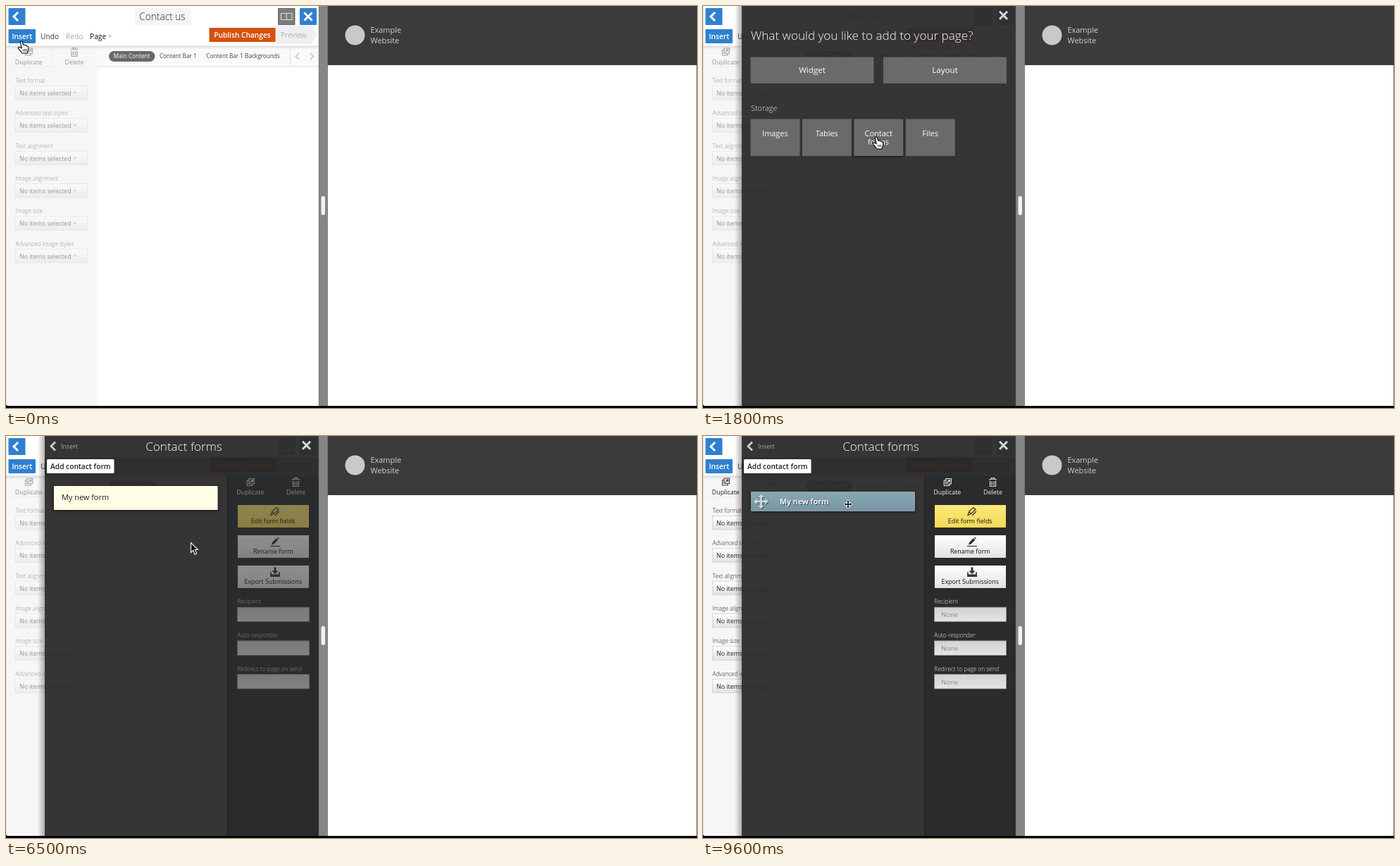
Recreate the animation shown at these times as an HTML page. Size 981x571 px, loop 9900 ms.

```html
<!DOCTYPE html>
<html lang="en">
<head>
<meta charset="utf-8">
<title>Adding a contact form</title>
<style>
  html, body { margin: 0; width: 100%; height: 100%; overflow: hidden; background: #000; }
  svg { display: block; }
  text { font-family: "Open Sans", "Noto Sans", sans-serif; white-space: pre; }
</style>
</head>
<body>
<svg id="stage" width="981" height="571" viewBox="0 0 981 571"></svg>
<script>
const LOOP = 9900, STEP = 100;
const SMALL = 8.2, LABEL = 8.9, MENU = 10.2, BODY = 10.93, HEAD = 17.1;

// Markup helpers
const text = (x, y, size, str, fill, weight = 400, anchor = 'start', extra = '') =>
  `<text x="${x}" y="${y}" font-size="${size}" fill="${fill}" font-weight="${weight}" text-anchor="${anchor}" ${extra}>${str}</text>`;
const mid = (x, y, size, str, fill, weight) => text(x, y, size, str, fill, weight, 'middle');
const rect = (x, y, w, h, fill, extra = '') =>
  `<rect x="${x}" y="${y}" width="${w}" height="${h}" fill="${fill}" ${extra}/>`;
const line = (d, stroke, width, extra = '') =>
  `<path d="${d}" fill="none" stroke="${stroke}" stroke-width="${width}" ${extra}/>`;
const fill = (d, color, extra = '') => `<path d="${d}" fill="${color}" ${extra}/>`;
const group = (id, body, extra = '') => `<g id="${id}" ${extra}>${body}</g>`;
const cross = (x, y, r, color, width) =>
  line(`M${x - r} ${y - r}l${2 * r} ${2 * r}m0 ${-2 * r}l${-2 * r} ${2 * r}`, color, width);
const chevron = (x, y, r, color, width) => line(`M${x + r} ${y - r}l${-r} ${r}l${r} ${r}`, color, width);
const grad = (id, from, to) =>
  `<linearGradient id="${id}" x2="0" y2="1"><stop stop-color="${from}"/><stop offset="1" stop-color="${to}"/></linearGradient>`;

// Icons, centred on x, y
const at = (x, y, body) => `<g transform="translate(${x} ${y})">${body}</g>`;
const copyIcon = (x, y, c) => at(x, y,
  line('M-2.5-5H5V2.5H-2.5ZM-3-2.5H-5V5H2.5V3', c, 1.2) + line('M-1 1L3-3M0-3H3V0', c, 1.2));
const binIcon = (x, y, c) => at(x, y,
  line('M-5.5-4H5.5M-2-4V-6H2V-4M-4-2V6H4V-2M-1.5-1V4.5M1.5-1V4.5', c, 1.2));
const pencilIcon = (x, y, c) => at(x, y,
  line('M-6 5L-4.5 0L2-6L5-3L-1.5 3ZM-4.5 0L-1.5 3M0 5.5L6-.5', c, 1.2));
const penIcon = (x, y, c) => at(x, y, fill('M-5 4L-4 .5L2-5.5L4.5-3L-1.5 3ZM3-6.3L4-7L6-5L5.2-4Z', c) + line('M-7 6H7', c, 1.2));
const saveIcon = (x, y, c) => at(x, y,
  fill('M-1.5-7H1.5V-2H4.5L0 2.5L-4.5-2H-1.5Z', c) + line('M-6 0V5.5H6V0', c, 1.8) + line('M-6 4H6', c, 2));
const fourWay = 'M0-10L4-6H1.3V-1.3H6V-4L10 0L6 4V1.3H1.3V6H4L0 10L-4 6H-1.3V1.3H-6V4L-10 0L-6-4V-1.3H-1.3V-6H-4Z';

const defs = `<defs>
  ${grad('btn', '#fff', '#e2e2e2')}${grad('gold', '#fbe878', '#f5da59')}
  ${grad('field', '#d2d2d2', '#e4e4e4')}${grad('row', '#fff', '#ededed')}${grad('rowOn', '#89a8b5', '#7796a4')}
  ${grad('topShade', '#000', '#fff')}
  <linearGradient id="edge"><stop stop-opacity="0"/><stop offset="1" stop-opacity=".3"/></linearGradient>
  <linearGradient id="under" x2="0" y2="1"><stop stop-opacity=".12"/><stop offset="1" stop-opacity="0"/></linearGradient>
  <clipPath id="editor"><path d="M0 0H444V568H4Q0 568 0 564Z"/></clipPath>
  <filter id="drop" x="-20%" y="-20%" width="140%" height="150%"><feDropShadow dx="0" dy="1" stdDeviation="2" flood-opacity=".6"/></filter>
  <filter id="engrave"><feDropShadow dx="1" dy="1" stdDeviation=".3" flood-color="#26343b" flood-opacity=".9"/></filter>
</defs>`;

// Editor behind the sliding panel
const selects = ['Text format', 'Advanced text styles', 'Text alignment', 'Image alignment', 'Image size', 'Advanced image styles'];
const sidebar = copyIcon(32.5, 65, '#444') + mid(32.3, 82.5, LABEL, 'Duplicate', '#222') +
  binIcon(97, 65.5, '#444') + mid(97, 82.5, LABEL, 'Delete', '#222') +
  selects.map((name, i) => {
    const y = i * 46.35;
    return text(13.5, 109 + y, SMALL, name, '#222', 300) +
      rect(13.5, 113.5 + y, 102, 19.5, 'url(#btn)', 'stroke="#cfcfcf" stroke-width=".8"') +
      text(19, 127 + y, LABEL, 'No items selected', '#222') +
      fill(`M95.5 ${122 + y}h5l-2.5 3z`, '#aaa');
  }).join('');

const editor = rect(0, 0, 444, 568, '#fff') +
  rect(0, 57, 129.5, 511, '#f6f6f6') + rect(129.5, 57, 315, 29, '#fafafa') +
  line('M129.5 86.2H444M403.5 57V86', '#dedede', 1) +
  line('M65 58V86M0 86H129', '#eee', 1) + line('M.5 0V568', '#e4e4e4', 1) +
  rect(0, 56.5, 444, 5, 'url(#under)') +
  rect(3.5, 3, 24, 24, '#2f80cf', 'rx="1"') + chevron(11, 15, 6, '#fff', 3) +
  rect(182.5, 3, 80, 24, '#f5f5f5', 'rx="2"') + mid(222, 19.7, 13.66, 'Contact us', '#222', 300) +
  rect(386.5, 3.5, 23.5, 23, '#7c7c7c', 'stroke="#555" stroke-width=".8"') +
  line('M390.5 10.5H406V19.5H390.5ZM398.3 10.5V19.5', '#ddd', 1.1) +
  rect(417, 3, 24, 24, '#2f80cf', 'rx="1"') + cross(429, 15, 5.5, '#fff', 3) +
  rect(3.5, 33, 38.5, 20, '#2f80cf', 'rx="1"') + mid(22.8, 46.5, MENU, 'Insert', '#fff', 600) +
  text(49, 46.5, MENU, 'Undo', '#333') + text(85, 46.5, MENU, 'Redo', '#aaa') +
  text(119, 46.5, MENU, 'Page', '#111') + fill('M145 41.5h5l-2.5 3z', '#bbb') +
  fill('M382 28H433L441.5 41L433 54H382Z', '#efefef') +
  rect(288.5, 31, 94, 20, '#d4500f') + mid(335.5, 44.6, MENU, 'Publish Changes', '#fff', 600) +
  mid(408.3, 44.6, MENU, 'Preview', '#b0b0b0') +
  rect(146, 64, 65.5, 15, '#686868', 'rx="7.5"') + mid(178.6, 74.4, SMALL, 'Main Content', '#fff') +
  mid(244.3, 74.4, SMALL, 'Content Bar 1', '#444') + mid(336.5, 74.4, SMALL, 'Content Bar 1 Backgrounds', '#444') +
  chevron(411.5, 71.5, 4.5, '#ccc', 2) + line('M432 67l4.5 4.5l-4.5 4.5', '#ccc', 2) +
  group('sidebar', sidebar);

// Panel: choose what to insert
const tile = (x, y, w, h, extra = '') => rect(x, y, w, h, '#6a6a6a', `stroke="#747474" stroke-width=".7" ${extra}`);
const chooser = text(68, 48.3, HEAD, 'What would you like to add to your page?', '#fff', 300) +
  tile(68, 73, 174, 36.5) + mid(155, 95, 11.6, 'Widget', '#fff') +
  tile(256.5, 73, 174, 36.5) + mid(343.5, 95, 11.6, 'Layout', '#fff') +
  text(68, 149, BODY, 'Storage', '#e4e4e4', 300) +
  ['Images', 'Tables', 'Contact', 'Files'].map((name, i) => {
    const x = 68 + i * 73.4;
    return tile(x, 161, 69, 51.5, i === 2 ? 'id="hover"' : '') + mid(x + 34.4, 185, BODY, name, '#fff');
  }).join('') + mid(249, 197, BODY, 'forms', '#fff');

// Panel: contact forms
const button = (y, paint, icon, label) =>
  rect(329, y, 101, 32, paint) + icon(382, y + 9.5, '#333') + mid(379.2, y + 26, LABEL, label, '#111');
const field = (y, label) => text(328.3, y - 5, SMALL, label, '#eee', 300) +
  rect(328.5, y, 102, 20.5, 'url(#field)', 'stroke="#8f8f8f" stroke-width=".8"');
const fieldTops = [243.2, 290.9, 338.5];
const tools = copyIcon(347.3, 65.5, '#ddd') + mid(346.8, 82.5, LABEL, 'Duplicate', '#eee') +
  binIcon(411.5, 65.5, '#ddd') + mid(411.5, 82.5, LABEL, 'Delete', '#eee') +
  button(98, 'url(#gold)', pencilIcon, 'Edit form fields') +
  button(141, 'url(#btn)', penIcon, 'Rename form') +
  button(184, 'url(#btn)', saveIcon, 'Export Submissions') +
  ['Recipient', 'Auto-responder', 'Redirect to page on send'].map((s, i) => field(fieldTops[i], s)).join('');

const formsPage = rect(55, 30, 389, 27, '#000', 'opacity=".12"') +
  rect(314, 57, 130, 511, '#2a2b2d') + line('M314.5 57V568', '#1f1f1f', 1) +
  chevron(64, 14.5, 6, '#ccc', 2.8) + text(78, 18.3, LABEL, 'Insert', '#aaa') +
  mid(252.5, 21, HEAD, 'Contact forms', '#fff', 300) +
  rect(58, 33, 95.5, 20, '#fff', 'rx="1.5"') + mid(105.8, 46.5, MENU, 'Add contact form', '#222', 600) +
  group('tools', tools) + group('values', fieldTops.map(y => text(338, y + 14, 9.56, 'None', '#888')).join('')) +
  group('empty', mid(184.5, 104.5, HEAD, "You haven't added any", '#e8e8e8', 300) + mid(184.5, 125, HEAD, 'forms yet', '#e8e8e8', 300)) +
  group('naming', rect(68, 71, 232.5, 34, '#fffde6', 'rx="1" filter="url(#drop)"') +
    text(79, 91, BODY, 'Name your new form', '#b5b3a2', 400, 'start', 'id="hint"') +
    text(79, 91, BODY, '', '#222', 400, 'start', 'id="typed"') + rect(79, 80, 1, 13, '#222', 'id="caret"')) +
  group('item', rect(68, 79.5, 232.5, 27, 'url(#row)', 'rx="1" filter="url(#drop)"') +
    rect(68, 79.5, 232.5, 27, 'url(#rowOn)', 'rx="1" id="tint"') +
    group('itemInk', at(82.5, 93, fill(fourWay, 'currentColor', 'id="grip"')) +
      text(109, 97, BODY, 'My new form', '#222', 600, 'start', 'id="itemName"')));

const panel = rect(45, 0, 10, 568, 'url(#edge)') + rect(55, 0, 389, 568, '#2c2c2c', 'opacity=".955"');

const site = rect(456.5, 0, 524, 568, '#fff') + rect(456.5, 0, 524.5, 84, '#3a3b3a') +
  '<circle cx="495.5" cy="41.5" r="14" fill="#c9c9c9"/>' +
  text(517.5, 38, BODY, 'Example', '#d0d0d0') + text(517.5, 53, BODY, 'Website', '#d0d0d0') +
  rect(444, 0, 12.5, 568, '#858585') + line('M444.3 0V568', '#777', .8) +
  rect(447.5, 270, 5.5, 27, '#f2f2f2', 'rx="2.7"');

// Pointers, hot spot at 0, 0
const pointers = group('hand', fill('M-1.6 1Q-.4-.8 1.2 .7L2.6 5.4Q4.3 4.4 5.2 6Q7 5.2 7.6 7Q9.6 6.8 9.8 9.4L9.4 12.5L8 17H1L-2.2 12.8L-5 9.8Q-4.8 7.8-2.4 8.4L.2 10Z',
    '#fff', 'stroke="#000" stroke-width="1.1" stroke-linejoin="round"') + line('M2.3 11.2L3 14.5M4.4 11L4.9 14.5M6.5 10.8L6.7 14.5', '#000', .8)) +
  group('arrow', fill('M.5 .5V14.5L3.7 11.5L6 17L8.6 15.9L6.3 10.5H10.5Z', '#111', 'stroke="#fff" stroke-width="1.1"')) +
  group('move', `<g transform="scale(.5)">${fill(fourWay, '#000', 'stroke="#fff" stroke-width="3" paint-order="stroke"')}</g>`);

const stage = document.getElementById('stage');
stage.innerHTML = defs + rect(0, 0, 981, 571, '#050608') +
  `<g clip-path="url(#editor)">${editor}${group('panel', panel)}${group('chooser', chooser)}${group('forms', formsPage)}` +
  group('close', cross(426.5, 13.3, 5.5, '#d8d8d8', 3)) + '</g>' + site + group('pointer', pointers);

const el = {};
stage.querySelectorAll('[id]').forEach(node => el[node.id] = node);
const show = (node, on) => { node.style.display = on ? '' : 'none'; };
const between = (t, a, b) => t >= a && t < b;
const clamp = v => Math.max(0, Math.min(1, v));

const path = [
  [0, 22, 50], [100, 22, 47], [900, 22, 47], [1400, 218, 150], [1500, 229, 167], [1600, 238, 178],
  [1800, 246, 186], [2500, 246, 186], [2700, 155, 85], [2900, 106, 24], [3000, 106, 24], [3200, 102, 42],
  [6300, 102, 42], [6400, 258, 138], [6500, 262, 151], [6900, 258, 212], [7900, 258, 212],
  [8100, 222, 122], [8200, 206, 97], [LOOP, 206, 97]
];
const shapes = [[0, 'hand'], [900, 'arrow'], [1400, 'hand'], [2400, 'arrow'], [3200, 'hand'], [4300, ''], [6400, 'arrow'], [8200, 'move']];
const typing = [[0, ''], [4300, 'M'], [4400, 'My'], [4600, 'My n'], [4700, 'My ne'], [4800, 'My new'], [5000, 'My new '],
  [5200, 'My new f'], [5300, 'My new fo'], [5600, 'My new for'], [5700, 'My new form']];
const latest = (table, t) => table.filter(row => row[0] <= t).pop()[1];

function pointerAt(t) {
  const i = Math.max(1, path.findIndex(p => p[0] > t));
  const [t0, x0, y0] = path[i - 1], [t1, x1, y1] = path[i];
  const k = (t - t0) / (t1 - t0);
  return [x0 + (x1 - x0) * k, y0 + (y1 - y0) * k];
}

function render(t) {
  const slide = 389 * (1 - clamp((t - 450) / 500)) ** 3;
  const fade = clamp((t - 900) / 400);
  const enabled = between(t, 6900, 7200) || t >= 9100;

  show(el.panel, t >= 500);
  el.panel.setAttribute('transform', `translate(${slide.toFixed(2)} 0)`);
  show(el.chooser, between(t, 900, 2200));
  show(el.close, t >= 900);
  el.chooser.setAttribute('opacity', fade);
  el.close.setAttribute('opacity', fade);
  el.hover.setAttribute('filter', between(t, 1400, 2200) ? 'url(#drop)' : 'none');

  show(el.forms, t >= 2200);
  show(el.empty, t < 3500);
  show(el.naming, between(t, 3500, 6900));
  show(el.item, t >= 6900);
  show(el.values, enabled);
  el.tools.setAttribute('opacity', enabled ? 1 : .47);
  el.sidebar.setAttribute('opacity', enabled ? 1 : .45);

  const typed = latest(typing, t);
  el.typed.textContent = typed;
  show(el.hint, !typed);
  show(el.caret, !between(t, 4000, 4300) && !between(t, 6200, 6700));
  el.caret.setAttribute('x', 79 + (typed ? el.typed.getComputedTextLength() : 0));

  const tint = between(t, 6900, 7200) ? 1 : clamp((t - 8700) / 200);
  const on = tint > .4;
  el.tint.setAttribute('opacity', tint);
  el.grip.setAttribute('fill', on ? '#d5dadc' : '#c2c2c2');
  el.itemName.setAttribute('fill', on ? '#fff' : '#222');
  el.itemInk.setAttribute('filter', on ? 'url(#engrave)' : 'none');

  const [x, y] = pointerAt(t), shape = latest(shapes, t);
  el.pointer.setAttribute('transform', `translate(${x.toFixed(1)} ${y.toFixed(1)})`);
  for (const name of ['hand', 'arrow', 'move']) show(el[name], name === shape);
}

const start = performance.now();
function tick() {
  const t = (performance.now() - start) % LOOP;
  render(Math.floor(t / STEP) * STEP);
  requestAnimationFrame(tick);
}
tick();
</script>
</body>
</html>
```
